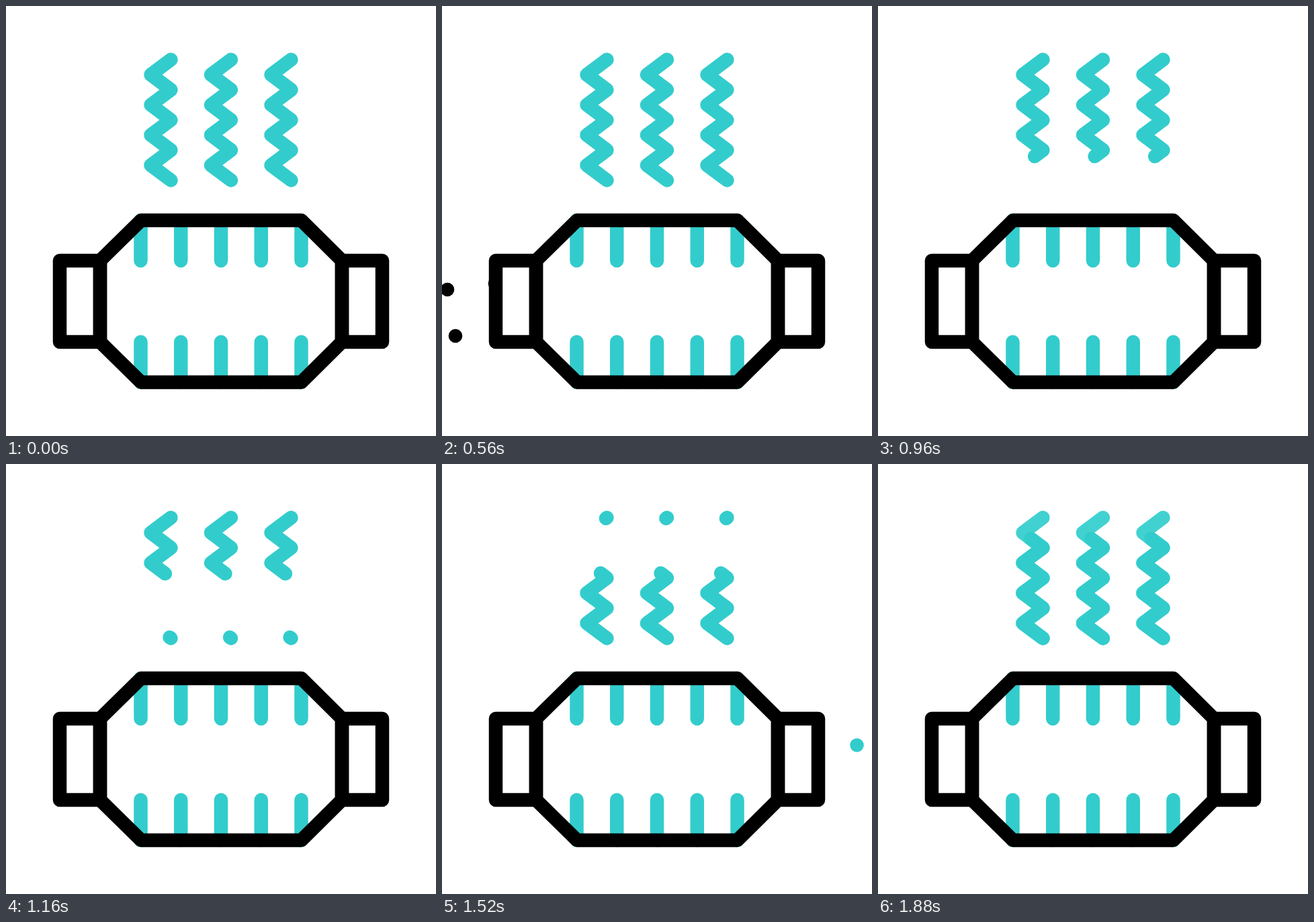
Recreate the animation shown at these times as an HTML page with a canvas. Size 640 px wide and 640 px high, loop 2 s.

```html
<!DOCTYPE html>
<html>
<head>
<meta charset="utf-8">
<style>
  html, body { margin: 0; height: 100%; overflow: hidden; background: #fff; }
  canvas { display: block; width: 100vmin; height: 100vmin; }
</style>
</head>
<body>
<canvas width="640" height="640"></canvas>
<script>
const ctx = document.querySelector('canvas').getContext('2d');
const LOOP = 2000, STEP = 40, SPEED = 14.25 / STEP;
const TEAL = '#33cccc', PALE = '#42d1d1', BLACK = '#000';

// [x, y] of the particles, at 400 ms going in and at 1520 ms coming out
const inflow = [[47, 462], [22, 413], [-37, 491], [-49, 422], [-74, 482.5], [-97, 450], [-112, 468]];
const outflow = [[617.5, 418.5], [556, 472], [540, 440]];

const body = new Path2D('M201 319H439.5L500 379V500L439.5 560H201L140 500V379Z');
const pipes = new Path2D('M80 379H140V500H80Z M500 379H560V500H500Z');
const ribs = new Path2D();
for (let i = 0; i < 5; i++) {
  const x = 200.5 + i * 59.75;
  ribs.moveTo(x, 319);
  ribs.lineTo(x, 379);
  ribs.moveTo(x, 500);
  ribs.lineTo(x, 560);
}

function ease(t, start, end) {
  const u = Math.min(1, Math.max(0, (t - start) / (end - start)));
  return u * u * (3 - 2 * u);
}

// Three heat waves, each trimmed to the segments from..to of 0..8
function waves(from, to, color) {
  if (to <= from) return;
  const stops = [from];
  for (let s = Math.floor(from) + 1; s < to; s++) stops.push(s);
  stops.push(to);
  ctx.strokeStyle = color;
  for (let i = 0; i < 3; i++) {
    ctx.beginPath();
    for (const s of stops) {
      const x = 215.5 + 30 * Math.abs(1 - s % 2);
      ctx.lineTo(x + i * 89.5, 79.8 + 22.45 * s);
    }
    ctx.stroke();
  }
}

function dots(list, shift, color) {
  ctx.fillStyle = color;
  for (const [x, y] of list) {
    ctx.beginPath();
    ctx.arc(x + shift, y, 10.3, 0, 2 * Math.PI);
    ctx.fill();
  }
}

function draw(t) {
  ctx.fillStyle = '#fff';
  ctx.fillRect(0, 0, 640, 640);
  ctx.lineWidth = 20.5;
  ctx.lineCap = ctx.lineJoin = 'round';

  if (t >= 240 && t < 1000) dots(inflow, (t - 400) * SPEED, BLACK);
  if (t >= 1360 && t < 1880) dots(outflow, (t - 1520) * SPEED, TEAL);

  if (t < 1880) {
    waves(0, 8 * (1 - ease(t, 720, 1560)), TEAL);
    waves(8 * (1 - ease(t, 1120, 1880)), 8, TEAL);
  } else {
    waves(0, 8, PALE);
    waves(1.4, 8, TEAL);
  }

  ctx.fillStyle = '#fff';
  ctx.fill(pipes);
  ctx.fill(body);
  ctx.strokeStyle = TEAL;
  ctx.stroke(ribs);
  ctx.strokeStyle = BLACK;
  ctx.stroke(pipes);
  ctx.stroke(body);
}

function tick() {
  const t = performance.now() % LOOP;
  draw(Math.floor(t / STEP) * STEP);
  requestAnimationFrame(tick);
}
tick();
</script>
</body>
</html>
```
